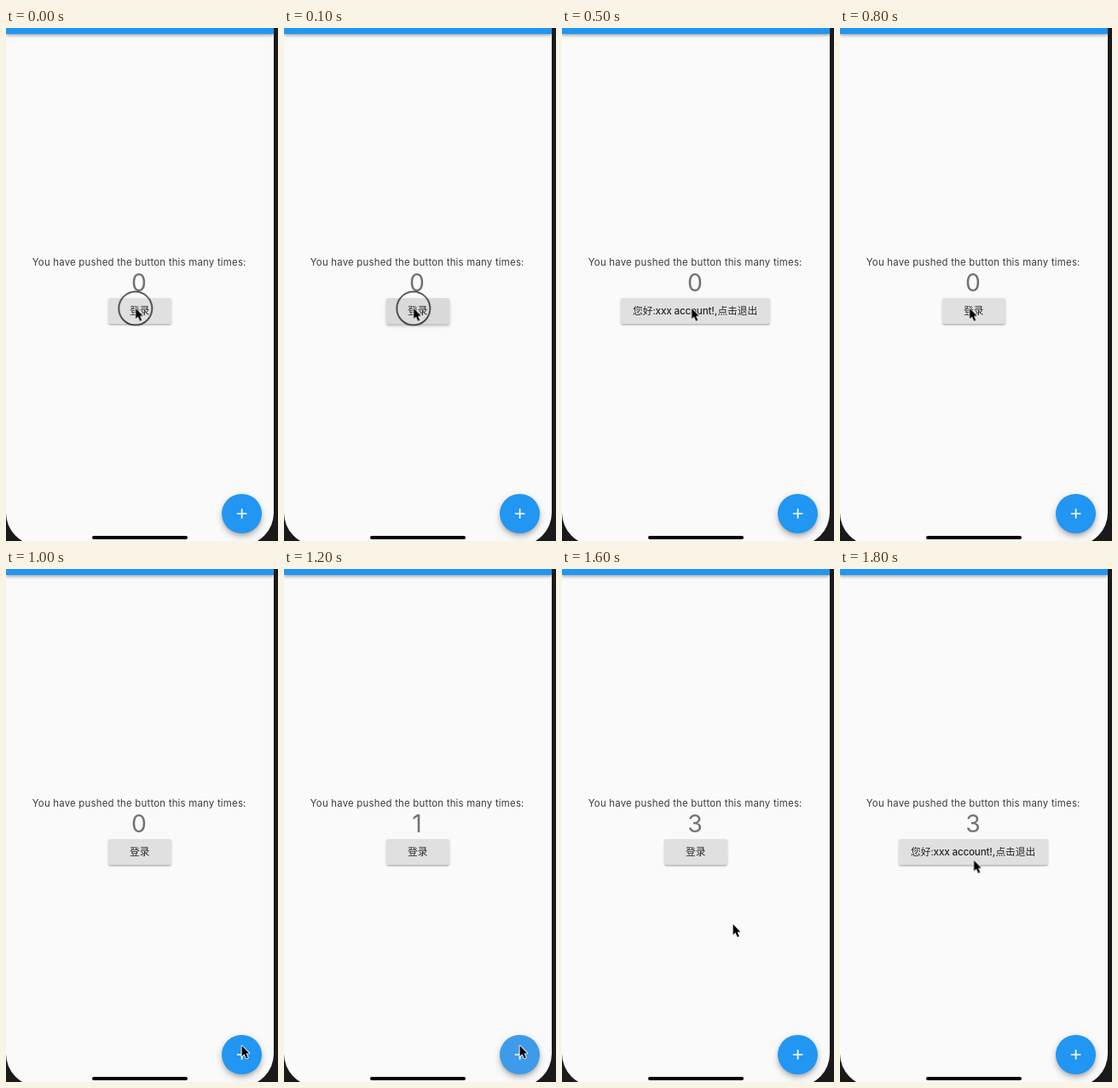
An HTML page for the animation above (2000 ms loop, 319 by 600 pixels).

```html
<!DOCTYPE html>
<html lang="en">
<head>
<meta charset="utf-8">
<title>Counter with login button</title>
<style>
  html, body { margin: 0; width: 100%; height: 100%; overflow: hidden; background: #1a1a1a; }
  body { position: relative; font-family: Inter, "Noto Sans CJK SC", "Noto Sans CJK", sans-serif; }
  div, svg { position: absolute; }

  /* The screen runs on below the stage, so its corners are cut off. */
  .screen { left: 0; top: 0; width: 313.5px; height: 605px; overflow: hidden;
    background: #fafafa; border-radius: 0 0 38px 38px; }
  .bar { left: 0; top: 0; width: 314px; height: 7px; background: #2196f3;
    box-shadow: 0 1.7px 3.3px rgba(0,0,0,.28), 0 1px 6px rgba(0,0,0,.12); }
  .home { left: 101px; top: 594px; width: 112px; height: 4px; border-radius: 2px; background: #000; }

  .count { left: 106px; top: 278px; width: 100px; height: 40px; overflow: hidden; }
  .digits { left: 0; top: 0; width: 100px; font-size: 28.3px; line-height: 40px;
    text-align: center; color: rgba(0,0,0,.54); }
  .digits span { display: block; }

  .button { top: 316px; height: 30px; border-radius: 2px; }
  .fab { left: 253.2px; top: 544.6px; width: 46.7px; height: 46.7px; border-radius: 50%;
    box-shadow: 0 3px 4px -1px rgba(0,0,0,.2), 0 5px 8px rgba(0,0,0,.14), 0 1px 10px rgba(0,0,0,.08); }

  .art { left: 0; top: 0; width: 319px; height: 600px; overflow: visible; }
  .info { font-size: 11.4px; letter-spacing: .22px; fill: rgba(0,0,0,.76); text-anchor: middle; }
  .label { font-size: 11.7px; fill: rgba(0,0,0,.82); }
  .latin { font-weight: 500; letter-spacing: -.2px; }

  .digits, .button, .fab, .short, .long, .cursor, .ring {
    animation: 2s step-end infinite; }
  .digits { animation-name: tally; }
  .button { animation-name: size, press; }
  .fab { animation-name: glow; }
  .short { animation-name: loggedOut; }
  .long { animation-name: loggedIn; }
  .cursor { animation-name: travel; }
  .ring { animation-name: click; }

  @keyframes tally {
    0% { transform: none; }
    60% { transform: translateY(-40px); }
    70% { transform: translateY(-80px); }
    80%, 100% { transform: translateY(-120px); }
  }
  @keyframes size {
    0%, 40% { left: 120px; width: 74px; }
    10%, 90%, 100% { left: 69px; width: 175px; }
  }
  @keyframes press {
    0%, 25%, 40%, 90%, 100% { background: #e0e0e0;
      box-shadow: 0 2px 1.5px -.5px rgba(0,0,0,.18), 0 1px 3px rgba(0,0,0,.17); }
    5%, 20%, 35%, 85% { background: #dadada;
      box-shadow: 0 2.5px 3px rgba(0,0,0,.16), 0 2px 5px rgba(0,0,0,.12); }
    10%, 15% { background: #d5d6d6;
      box-shadow: 0 4px 4px -1px rgba(0,0,0,.17), 0 5px 8px rgba(0,0,0,.13), 0 2px 7px rgba(0,0,0,.06); }
  }
  @keyframes glow {
    0%, 80%, 100% { background: #2196f3; }
    55% { background: #3299ee; }
    60% { background: #3d9bea; }
    70% { background: #449fe9; }
  }
  @keyframes loggedOut {
    0%, 40% { opacity: 1; }
    10%, 90%, 100% { opacity: 0; }
  }
  @keyframes loggedIn {
    0%, 40% { opacity: 0; }
    10%, 90%, 100% { opacity: 1; }
  }
  @keyframes travel {
    0% { transform: translate(151.5px, 327.3px); }
    45% { transform: translate(214px, 442px); }
    50% { transform: translate(276px, 557px); }
    70% { transform: translate(277px, 557px); }
    80% { transform: translate(200px, 415px); }
    85%, 100% { transform: translate(156.5px, 340.3px); }
  }
  @keyframes click {
    0%, 35%, 55%, 65%, 75%, 85% { opacity: 1; }
    10%, 40%, 60%, 70%, 80%, 90%, 100% { opacity: 0; }
  }
</style>
</head>
<body>
<div class="screen">
  <div class="bar"></div>
  <div class="count">
    <div class="digits"><span>0</span><span>1</span><span>2</span><span>3</span></div>
  </div>
  <div class="button"></div>
  <div class="fab"></div>
  <div class="home"></div>
</div>
<svg class="art" viewBox="0 0 319 600">
  <text class="info" x="156.2" y="277.6">You have pushed the button this many times:</text>
  <text class="label short" x="145" y="335">登录</text>
  <text class="label long" y="335"><tspan x="83">您好:</tspan><tspan class="latin" x="109.6">xxx account!,</tspan><tspan x="182.4">点击退出</tspan></text>
  <path d="M270.8 568h11.6M276.6 562.2v11.6" stroke="#fff" stroke-width="1.7"/>
  <g class="cursor">
    <circle class="ring" cx=".3" cy=".7" r="19.5" fill="none" stroke="#000" stroke-width="1.3"/>
    <path d="M.6 .6V13L3.4 10.3 5.7 15.4 7.8 14.4 5.6 9.4H9.3Z" fill="#000" stroke="#fff" stroke-width="1.7" stroke-linejoin="round" paint-order="stroke"/>
  </g>
</svg>
</body>
</html>
```
